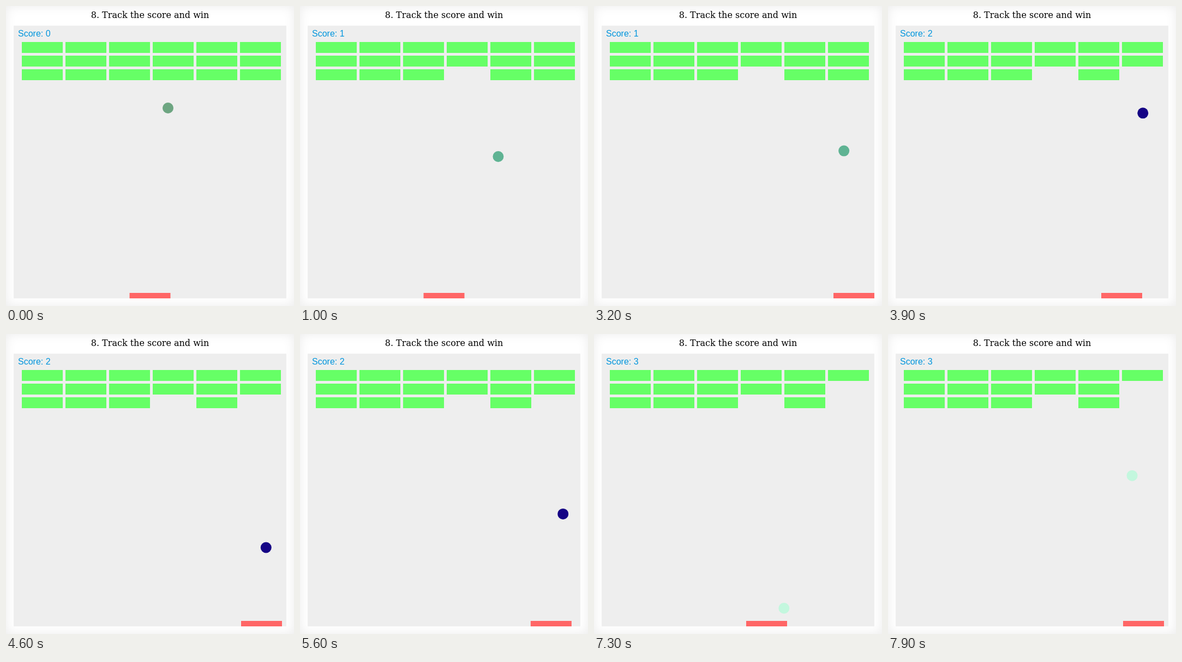
An HTML page with a canvas that plays this animation: 528 by 550 pixels, repeating every 8 s.

```html
<!DOCTYPE html>
<html lang="en">
<head>
<meta charset="utf-8">
<title>Brick game</title>
<style>
html, body { margin: 0; width: 100%; height: 100%; overflow: hidden; background: #fff; }
body { box-shadow: inset 0 0 20px rgba(0, 0, 0, .08); }
h1 { position: absolute; top: 7px; left: 0; width: 528px; margin: 0; text-align: center;
  font: 16px/19px "DejaVu Serif", "Noto Serif", serif; color: #000; }
canvas { position: absolute; left: 14px; top: 36px; background: #eee; }
</style>
</head>
<body>
<h1>8. Track the score and win</h1>
<canvas width="500" height="500"></canvas>
<script>
const LOOP = 8000, STEP = 100, COLS = 6, ROWS = 3;
const PADDLE_START = 226.5, PADDLE_SPEED = 0.48;
const ctx = document.querySelector('canvas').getContext('2d');
ctx.translate(-14, -36);

// The ball flies straight between bounces: [time, x, y] in stage pixels
const bounces = [
  [0, 297, 187], [279, 315.5, 131], [2243, 446, 526], [3680, 464.3, 135],
  [5070, 483.1, 522.5], [5330, 503.5, 428], [6211, 434, 108], [7364, 343.3, 526],
  [LOOP, 467, 210]
];
const ballColors = ['#6da581', '#5fb393', '#150485', '#c3f7de'];

// Key presses: [time, left edge where the paddle stops]
const moves = [
  [1150, 434.5], [1783, 426.5], [2000, 394.5], [2220, 439], [3250, 391],
  [4000, 431], [5583, 383], [6800, 279], [7380, 431]
];

const brickAt = (x, y) => [Math.floor((x - 29) / 80), Math.floor((y - 66) / 25)];

function ballAt(t) {
  const next = bounces.findIndex(b => b[0] > t);
  const [t0, x0, y0] = bounces[next - 1], [t1, x1, y1] = bounces[next];
  const k = (t - t0) / (t1 - t0);
  return [x0 + (x1 - x0) * k, y0 + (y1 - y0) * k];
}

function paddleAt(t) {
  let left = PADDLE_START;
  for (const [start, stop] of moves) {
    const reach = Math.max(0, t - start) * PADDLE_SPEED;
    left += Math.max(-reach, Math.min(reach, stop - left));
  }
  return left;
}

// A brick is gone once the ball has bounced inside it
function brokenAt(t) {
  return bounces.filter(b => b[0] <= t)
    .map(([, x, y]) => brickAt(x, y))
    .filter(([, row]) => row < ROWS)
    .map(String);
}

function draw(t) {
  const broken = brokenAt(t), score = broken.length;
  ctx.clearRect(14, 36, 500, 500);

  ctx.fillStyle = '#66ff66';
  for (let col = 0; col < COLS; col++)
    for (let row = 0; row < ROWS; row++)
      if (!broken.includes(String([col, row])))
        ctx.fillRect(29 + col * 80, 66 + row * 25, 75, 20);

  ctx.fillStyle = ballColors[score];
  ctx.beginPath();
  ctx.arc(...ballAt(t), 10, 0, Math.PI * 2);
  ctx.fill();

  ctx.fillStyle = '#ff6666';
  ctx.fillRect(paddleAt(t), 526, 75, 10);

  ctx.fillStyle = '#0095dd';
  ctx.font = '16px "Liberation Sans", Arial, sans-serif';
  ctx.fillText('Score: ' + score, 22, 56);
}

const start = performance.now();
function tick() {
  const t = (performance.now() - start) % LOOP;
  draw(Math.floor(t / STEP) * STEP);
  requestAnimationFrame(tick);
}
tick();
</script>
</body>
</html>
```
